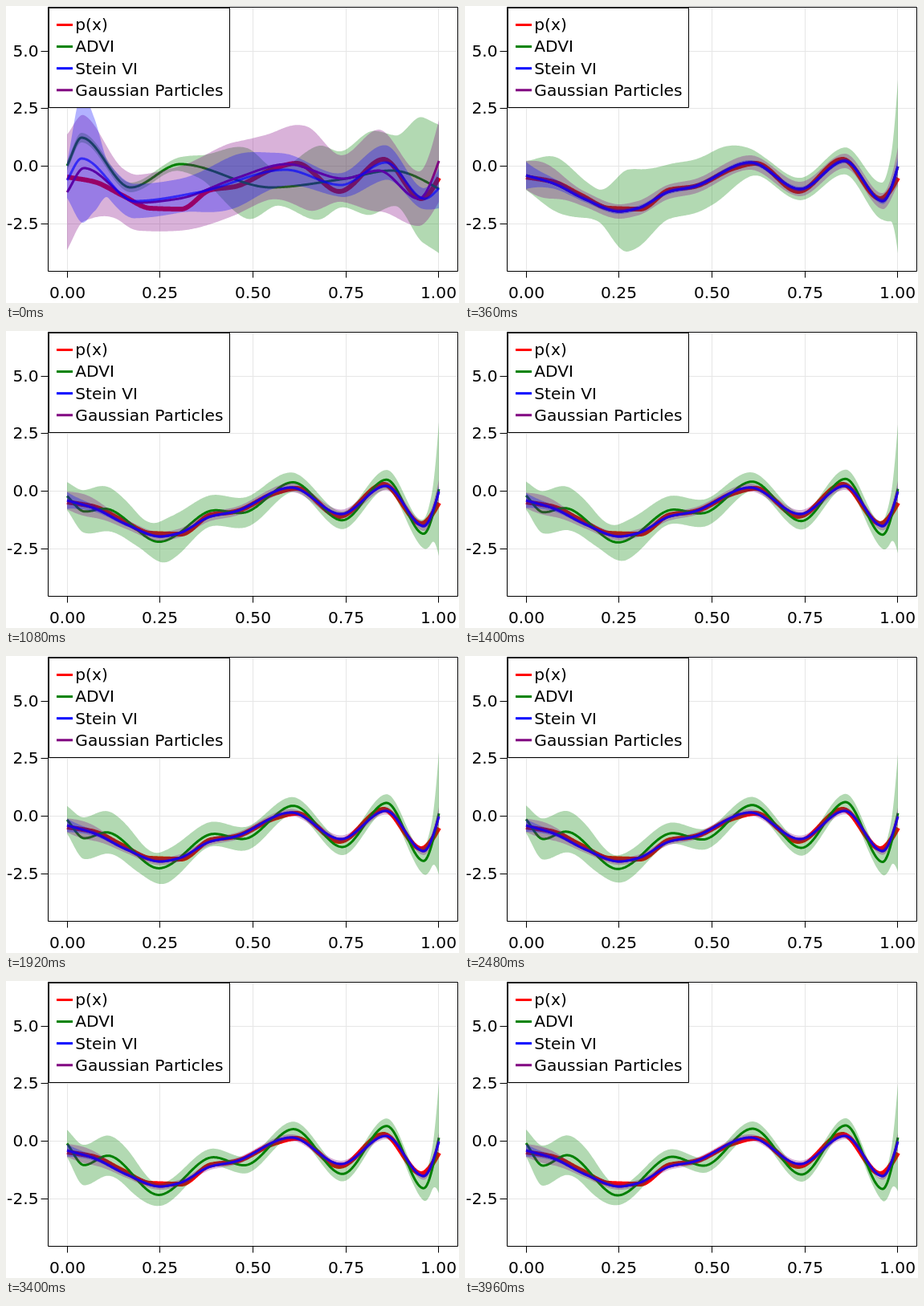
An HTML page with a canvas that plays this animation: 564x370 px, repeating every 4000 ms.

```html
<!DOCTYPE html>
<html lang="en">
<head>
<meta charset="utf-8">
<title>Posterior bands</title>
<style>
html, body { margin: 0; width: 100%; height: 100%; overflow: hidden; background: #fff; }
canvas { display: block; }
</style>
</head>
<body>
<canvas id="stage" width="564" height="370"></canvas>
<script>
const ctx = document.getElementById("stage").getContext("2d");
const LOOP = 4000, STEP = 40, SETTLE = 360;
const LEFT = 52.5, RIGHT = 562.5, TOP = 1.5, BOTTOM = 330.5;
const FIRST = 76, LAST = 539;
const xs = Array.from({ length: LAST - FIRST + 1 }, (_, i) => FIRST + i);

const blend = (a, b, p) => a.map((v, i) => v + (b[i] - v) * p);
const bump = (x, center, width) => Math.exp(-(((x - center) / width) ** 2));
const edge = (x, width) => Math.exp((x - LAST) / width);

// Smooth curve through [x, y] turning points, level at each peak and dip.
function curve(...points) {
  const end = points.length - 1;
  const secant = i => (points[i + 1][1] - points[i][1]) / (points[i + 1][0] - points[i][0]);
  const slopes = points.map((_, i) => {
    if (i === 0) return secant(0);
    if (i === end) return secant(end - 1) * 1.5;
    const a = secant(i - 1), b = secant(i);
    return a * b > 0 ? 2 * a * b / (a + b) : 0;
  });
  return xs.map(x => {
    let i = 0;
    while (i < end - 1 && x > points[i + 1][0]) i++;
    const [x0, y0] = points[i], [x1, y1] = points[i + 1];
    const w = x1 - x0, s = (x - x0) / w, r = 1 - s;
    return y0 * r * r * (1 + 2 * s) + y1 * s * s * (3 - 2 * s) +
      w * s * r * (slopes[i] * r - slopes[i + 1] * s);
  });
}

const density = curve([76, 213], [110, 219], [145, 236], [180, 252], [218, 253], [255, 229],
  [285, 225], [335, 202], [362, 196], [415, 231], [470, 191], [517, 240], [539, 214]);
const fitted = curve([76, 211], [110, 221], [150, 241], [192, 256], [215, 252], [255, 231],
  [285, 225], [355, 195], [417, 228], [473, 193], [520, 243], [539, 200]);

// Each method starts loose and settles on the fitted curve; half is the band's half-width.
const stein = {
  mean: curve([76, 217], [94, 190], [160, 243], [240, 232], [348, 204], [417, 223],
    [473, 195], [521, 240], [539, 227]),
  half: curve([76, 22], [95, 80], [110, 58], [128, 22], [215, 21], [285, 33], [335, 22],
    [405, 14], [465, 22], [519, 13], [539, 25]),
  settled: xs.map(x => 3 + 14 * Math.exp((FIRST - x) / 25) + 8 * edge(x, 8))
};
const particles = {
  mean: curve([76, 232], [97, 202], [165, 245], [215, 240], [285, 215], [350, 197],
    [420, 215], [464, 205], [514, 240], [539, 193]),
  half: curve([76, 72], [97, 66], [145, 34], [215, 40], [275, 46], [325, 41], [375, 52],
    [417, 29], [464, 51], [515, 34], [539, 51]),
  settled: xs.map(x => 9 + 13 * bump(x, 95, 30) + 15 * edge(x, 7))
};
const advi = {
  mean: curve([76, 199], [94, 164], [155, 226], [217, 197], [330, 226], [417, 216],
    [480, 205], [539, 228]),
  half: curve([76, 6], [192, 6], [240, 14], [300, 44], [338, 23], [390, 46], [417, 35],
    [455, 52], [485, 44], [519, 78], [539, 80]),
  settled: curve([76, 18], [115, 34], [165, 20], [203, 51], [255, 34], [310, 33],
    [375, 13], [460, 16], [519, 23], [530, 40], [539, 108]),
  lateMean: curve([76, 202], [97, 230], [127, 217], [190, 267], [258, 219], [297, 230],
    [358, 184], [419, 241], [474, 180], [520, 259], [539, 195]),
  lateHalf: curve([76, 17], [97, 25], [150, 24], [192, 12], [300, 9], [505, 9],
    [530, 24], [539, 67])
};

function bandAt(method, t) {
  const { mean, half, settled, lateMean, lateHalf } = method;
  if (t < SETTLE) {
    const p = 1 - (1 - t / SETTLE) ** 2;
    return [blend(mean, fitted, p), blend(half, settled, p)];
  }
  if (lateMean) {
    const p = ((t - SETTLE) / (LOOP - STEP - SETTLE)) ** 0.32;
    return [blend(fitted, lateMean, p), blend(settled, lateHalf, p)];
  }
  const shrink = 0.45 + 0.55 * Math.exp((SETTLE - t) / 600);
  return [fitted, settled.map(v => v * shrink)];
}

function drawCurve(ys, color, width, alpha = 1) {
  ctx.globalAlpha = alpha;
  ctx.strokeStyle = color;
  ctx.lineWidth = width;
  ctx.beginPath();
  ys.forEach((y, i) => ctx.lineTo(xs[i], y));
  ctx.stroke();
  ctx.globalAlpha = 1;
}

function drawBand([mean, half], color, lineAlpha) {
  ctx.beginPath();
  xs.forEach((x, i) => ctx.lineTo(x, mean[i] - half[i]));
  for (let i = xs.length - 1; i >= 0; i--) ctx.lineTo(xs[i], mean[i] + half[i]);
  ctx.globalAlpha = 0.3;
  ctx.fillStyle = color;
  ctx.fill();
  drawCurve(mean, color, 3, lineAlpha);
}

function line(x1, y1, x2, y2, color, width = 1) {
  ctx.strokeStyle = color;
  ctx.lineWidth = width;
  ctx.beginPath();
  ctx.moveTo(x1, y1);
  ctx.lineTo(x2, y2);
  ctx.stroke();
}

function label(text, x, y, align) {
  ctx.font = '20.2px "DejaVu Sans", sans-serif';
  ctx.textAlign = align;
  ctx.fillStyle = "#000";
  ctx.fillText(text, x, y);
}

function drawAxes() {
  for (let i = 0; i < 5; i++) {
    const x = Math.floor(76 + i * 115.7) + 0.5;
    line(x, TOP, x, BOTTOM, "#e6e6e6");
    line(x, BOTTOM, x, BOTTOM + 8, "#000");
    label((i / 4).toFixed(2), x, 364, "center");
  }
  for (let i = 0; i < 4; i++) {
    const y = Math.floor(56 + i * 71.8) + 0.5;
    line(LEFT, y, RIGHT, y, "#e6e6e6");
    line(LEFT - 9, y, LEFT, y, "#000");
    label((5 - i * 2.5).toFixed(1), 40.5, y + 6.3, "right");
  }
  ctx.strokeStyle = "#000";
  ctx.strokeRect(LEFT, TOP, RIGHT - LEFT, BOTTOM - TOP);
}

function drawLegend() {
  ctx.fillStyle = "#fff";
  ctx.fillRect(53.5, 2.5, 225, 124);
  ctx.strokeStyle = "#000";
  ctx.lineWidth = 1;
  ctx.strokeRect(53.5, 2.5, 225, 124);
  [["p(x)", "red"], ["ADVI", "green"], ["Stein VI", "blue"], ["Gaussian Particles", "purple"]]
    .forEach(([name, color], i) => {
      const y = 23.5 + i * 27.1;
      line(63, y, 83, y, color, 3);
      label(name, 86.3, y + 6.8, "left");
    });
}

function draw(t) {
  ctx.fillStyle = "#fff";
  ctx.fillRect(0, 0, 564, 370);
  ctx.lineJoin = "round";
  drawAxes();
  drawCurve(density, "red", 6);
  drawBand(bandAt(advi, t), "green");
  drawBand(bandAt(particles, t), "purple");
  drawBand(bandAt(stein, t), "blue", 0.65);
  drawLegend();
}

function tick() {
  draw(Math.floor(performance.now() % LOOP / STEP) * STEP);
  requestAnimationFrame(tick);
}
tick();
</script>
</body>
</html>
```
